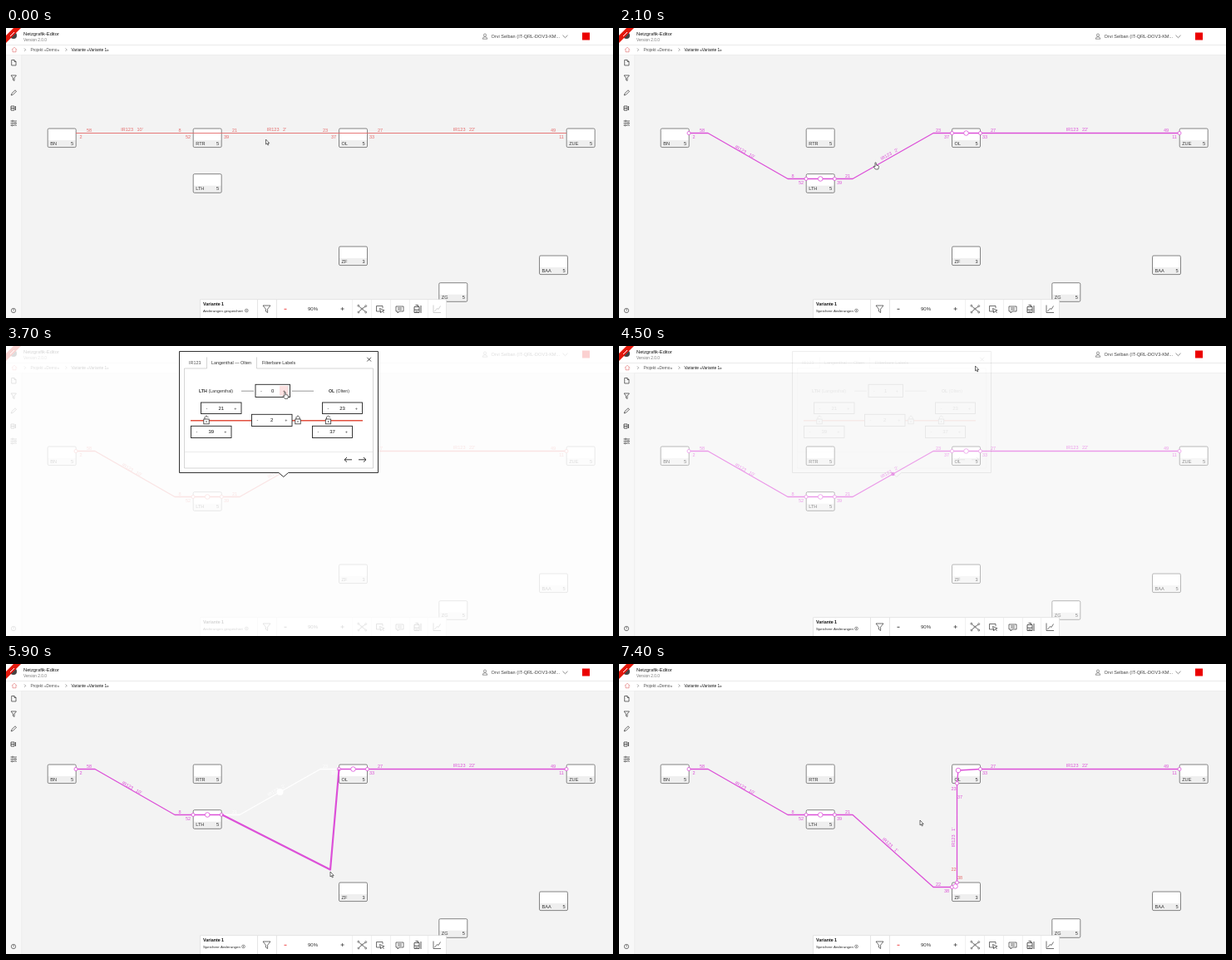
An HTML page that plays this animation: 730x349 px, repeating every 7500 ms.

```html
<!DOCTYPE html>
<html lang="de">
<head>
<meta charset="utf-8">
<title>Netzgrafik-Editor</title>
<style>
  html, body { margin: 0; width: 100%; height: 100%; overflow: hidden; background: #fff; }
  svg { display: block; width: 100vw; height: 100vh; }
  text { font-family: "Liberation Sans", Arial, sans-serif; }
</style>
</head>
<body>
<svg id="stage" viewBox="0 0 730 349"></svg>
<script>
const LOOP = 7500, STEP = 100;
const MAGENTA = '#dc50d8', RED = '#e56a6a', INK = '#333';
const stage = document.getElementById('stage');

const text = (x, y, s, size = 5.6, fill = INK, extra = '') =>
  `<text x="${x}" y="${y}" font-size="${size}" fill="${fill}" ${extra}>${s}</text>`;
const mid = (x, y, s, size, fill, extra = '') => text(x, y, s, size, fill, `text-anchor="middle" ${extra}`);
const rect = (x, y, w, h, fill, extra = '') =>
  `<rect x="${x}" y="${y}" width="${w}" height="${h}" fill="${fill}" ${extra}/>`;
const path = (d, stroke = INK, width = .7, fill = 'none') =>
  `<path d="${d}" fill="${fill}" stroke="${stroke}" stroke-width="${width}" stroke-linejoin="round"/>`;
const circle = (x, y, r, fill, stroke = 'none', width = .8) =>
  `<circle cx="${x}" cy="${y}" r="${r}" fill="${fill}" stroke="${stroke}" stroke-width="${width}"/>`;
const group = (x, y, body) => `<g transform="translate(${x} ${y})">${body}</g>`;
const fade = (opacity, body) => opacity > 0 ? `<g opacity="${opacity}">${body}</g>` : '';

// Piecewise interpolation over [time, ...values] keys.
function track(keys, t) {
  const next = keys.findIndex(k => k[0] > t);
  if (next < 0) return keys[keys.length - 1].slice(1);
  if (next === 0) return keys[0].slice(1);
  const a = keys[next - 1], b = keys[next];
  const u = (t - a[0]) / (b[0] - a[0]), e = u * u * (3 - 2 * u);
  return a.slice(1).map((v, i) => v + (b[i + 1] - v) * e);
}

const stations = {
  BN: [50.2, 121], RTR: [225.2, 121], OL: [400.5, 121], ZUE: [674.2, 121],
  LTH: [225.2, 175.7], ZF: [400.5, 263], BAA: [641.5, 274], ZG: [520.8, 306.7]
};

function station(name, active) {
  const [x, y] = stations[name];
  return group(x, y,
    rect(0, 0, 34, 22.6, '#fff', 'rx="1.5"') + rect(.4, 14, 33.2, 8.2, '#efefef') +
    rect(0, 0, 34, 22.6, 'none', `rx="1.5" stroke="${active ? MAGENTA : '#666'}" stroke-width="${active ? 1.6 : .8}"`) +
    text(3, 19.8, name) + text(31, 19.8, name === 'ZF' ? 3 : 5, 5.6, INK, 'text-anchor="end"'));
}

// Two minute labels beside a port; side is 1 when the line leaves to the right.
const minutes = (x, y, side, outer, inner, c) =>
  mid(x + side * 16, y - 2, outer, 5.5, c) + mid(x + side * 6, y + 6.5, inner, 5.5, c);
const lineName = (x, y, angle, time, c) =>
  mid(x, y, `IR123\u00a0\u00a0\u00a0${time}'`, 5.5, c, `transform="rotate(${angle} ${x} ${y})"`);
const port = (x, y, c) => circle(x, y, 2, '#fff', c);
const hub = (x, y, c, fill = '#fff') => circle(x, y, 2.8, fill, c);

function straightRoute(c, hover, white) {
  const Y = 126.5, w = hover ? 1.3 : .9;
  let s = path(`M84 ${Y}H400`, c, w) +
    minutes(84, Y, 1, 58, 2, c) + minutes(225, Y, -1, 8, 52, c) +
    minutes(259, Y, 1, 21, 39, c) + minutes(400, Y, -1, 23, 37, c) +
    lineName(151.5, 124, 0, 10, c) + lineName(325.5, 124, 0, 2, c);
  if (hover) s += port(225, Y, c) + port(259, Y, c) + hub(242.2, Y, c, white ? '#fff' : MAGENTA);
  return s;
}

function eastRoute(c, hover, direct) {
  const Y = 126.5;
  let s = path(`M${direct ? 400 : 434} ${Y}H674`, c, hover ? 1.3 : .9) +
    minutes(434, Y, 1, 27, 33, c) + minutes(674, Y, -1, 49, 11, c) + lineName(551, 124, 0, 22, c);
  if (hover) {
    s += port(434.5, Y, c) + port(674, Y, c);
    if (direct) s += port(400.5, Y, c) + hub(417.5, Y, c);
  }
  return s;
}

const westRoute = c =>
  path('M84 126.5H107L203 181.5H259', c, 1.3) +
  minutes(84, 126.5, 1, 58, 2, c) + minutes(225, 181.5, -1, 8, 52, c) +
  lineName(150.5, 150.5, 29.8, 10, c) +
  port(84, 126.5, c) + port(225, 181.5, c) + port(259.3, 181.5, c) + hub(242.2, 181.5, c);

const middleRoute = (c, stop) =>
  path('M261 181.5H281L378 126.5H400', c, 1.3) +
  minutes(259, 181.5, 1, 21, 39, c) + minutes(400, 126.5, -1, 23, 37, c) +
  lineName(326, 153.5, -29.6, 2, c) + (stop ? circle(329.5, 154, c === '#fff' ? 4 : 2.2, c) : '');

const detourRoute = c =>
  path('M261 181.5H281L378 268.5H400M402 268.5L406.5 263V143.5L408 128L434 126.5', c, 1.3) +
  minutes(259, 181.5, 1, 21, 39, c) + minutes(400, 268.5, -1, 22, 38, c) +
  lineName(325, 219, 42, 1, c) + lineName(404, 208.5, -90, 1, c) +
  mid(402.5, 152, 23, 5.5, c) + mid(410, 161.5, 37, 5.5, c) +
  mid(402.5, 249, 22, 5.5, RED) + mid(410, 259, 38, 5.5, RED) +
  port(400.5, 268.5, c) + port(406.5, 263, c) + hub(404.5, 267.5, c) +
  port(406.5, 143.5, c) + hub(408, 128, c);

const rubber = (a, [x, y], b) => path(`M${a}L${x} ${y}L${b}`, MAGENTA, 2.2);

function network(t, pointer) {
  const dialogOpen = t >= 2700 && t < 4400;
  const hover = t >= 600 && !dialogOpen;
  const c = hover ? MAGENTA : RED;
  const firstDrag = t >= 1100 && t < 1800, secondDrag = t >= 5200 && t < 6500;
  const active = {
    RTR: t >= 800 && t < 1400, LTH: t >= 1500 && t < 1800, ZF: t >= 6200 && t < 6500
  };
  let s = Object.keys(stations).map(n => station(n, active[n])).join('');
  if (t < 1800) {
    s += straightRoute(firstDrag ? '#fff' : c, hover, firstDrag);
    if (hover) s += port(84, 126.5, c);
    if (firstDrag) s += rubber('84 126.5', pointer, '400 126.5');
    return s + eastRoute(c, hover, true);
  }
  if (t < 6500) s += middleRoute(secondDrag ? '#fff' : c, t >= 3800);
  else s += detourRoute(c);
  s += westRoute(c) + eastRoute(c, true, t < 6500);
  if (secondDrag) s += rubber('260 181.5', [pointer[0], pointer[1] - 2.5], '400.5 126.5');
  return s;
}

function header() {
  return rect(0, 0, 730, 32, '#fff') + rect(0, 20, 730, .6, '#dcdcdc') + rect(0, 32, 730, .5, '#e6e6e6') +
    circle(9, 9, 4, '#444') + path('M0 18V9L9 0H18Z', 'none', 0, '#e3180c') +
    path('M5 10L10 5', '#fff', 1) +
    text(21, 9.3, 'Netzgrafik-Editor', 5.75, '#111') + text(21, 16, 'Version 2.0.0', 4.8, '#777') +
    circle(576, 8.6, 1.6, 'none', '#555', .6) + path('M573.2 13.2Q573.2 10.7 576 10.7T578.8 13.2Z', '#555', .6) +
    text(583.5, 12, 'Orvi Selban (IT-QRL-DOV3-KM...', 5.6, '#444') +
    path('M669.5 8.8L672.5 11.7L675.5 8.8', '#555', .7) +
    rect(693, 5.5, 9, 9, '#eb0000') +
    path('M7 26.2L10 23.2L13 26.2M8 25.5V28.8H12V25.5', '#d66', .6) +
    path('M22 24.5L23.7 26.2L22 27.9M71.5 24.5L73.2 26.2L71.5 27.9', '#666', .6) +
    text(29.5, 28, 'Projekt «Demo»', 4.85, '#555') + text(78.5, 28, 'Variante «Variante 1»', 4.75, '#111');
}

function sidebar() {
  return rect(0, 32.5, 19, 317, '#f8f8f8') + rect(18.6, 32.5, .5, 317, '#e4e4e4') +
    path('M6.7 38.5H10L12 40.5V45H6.7ZM10 38.5V40.5H12') +
    path('M6 57H12.4L10 60V63.5L8.4 62.4V60Z') +
    path('M6.2 81L7 78.6L11 74.8L12.5 76.2L8.5 80.2Z') +
    path('M6 94H10V99H6ZM6 96.5H10M11.5 94V99', INK, .8) +
    path('M5.5 112H13M5.5 114.5H13M5.5 117H13') +
    [[8, 112], [11, 114.5], [7.5, 117]].map(([x, y]) => circle(x, y, .9, '#fff', INK, .6)).join('') +
    circle(9, 340, 2.7, 'none', INK, .6) + path('M8.2 339.2Q9.2 337.5 9.8 339L9 340.3M9 341.3V341.8', INK, .5);
}

function toolbar(t) {
  const saving = (t >= 1900 && t < 2700) || t >= 4400;
  const minus = t < 1800 || t >= 5200 ? '#e33' : INK;
  const dividers = [302, 325, 416, 439, 462, 485, 507].map((x, i) =>
    rect(x, 327, .5, 22, i < 2 ? '#ccc' : '#e2e2e2')).join('');
  const status = saving ? 'Speichere Änderungen' : 'Änderungen gespeichert';
  const sx = saving ? 285.5 : 289.3;
  return rect(233.7, 326.8, 296, 23, '#fff', 'stroke="#d8d8d8" stroke-width=".6"') + dividers +
    text(237, 333.6, 'Variante 1', 5.3, '#111', 'font-weight="bold"') + text(237, 341.7, status, 4.4, '#222') +
    circle(sx, 340, 1.9, 'none', INK, .5) + path(`M${sx} 339V341`, INK, .5) +
    path('M309 334H318L314.6 338.2V342.5L312.4 341V338.2Z') +
    path('M334.5 338.3H337.5', minus, .9) + mid(369, 340, '90%', 6) + path('M402.5 338H406.7M404.6 336V340') +
    path('M424 334.5L428 338L432.5 335M428 338L424.5 341.5M428 338L432.5 341.5', INK, .7) +
    [[423.8, 334.2], [432.7, 334.6], [424, 342], [432.7, 342], [428, 338]].map(([x, y]) => circle(x, y, 1, '#fff', INK, .6)).join('') +
    path('M451 341H445.5V334.5H453V337M449.5 337.5L455 339.8L452.6 340.6L454.5 343M449.5 337.5L450.7 342.8L452.3 340.8') +
    path('M469 335H478V341H473L471 343V341H469ZM471 337H476M471 339H476') +
    path('M491 335.5H497V342.5H491ZM492.5 333.5H495.5V335.5M491 339H497M499 334V343M492.5 341H495.5', INK, .8) +
    path('M514 333.5V342.5H523M515.5 341L518.5 337.5L520 338.5L522.5 334.5', t < 300 ? '#bbb' : INK);
}

function stepper(x, y, w, h, value) {
  const base = y + h / 2 + 2;
  return rect(x, y, w, h, '#fff', 'stroke="#222" stroke-width=".9"') +
    mid(x + 7, base, '-') + mid(x + w / 2, base, value, 6, '#111') + mid(x + w - 7, base, '+');
}

const lock = (x, open) => rect(x - 3.2, 88, 6.4, 5.8, '#fff', `stroke="${INK}" stroke-width=".8"`) +
  path(`M${x - 2} 88V85.7Q${x} 82.5 ${x + 2} 85.7V${open ? 86 : 88}M${x} 90V92`, INK, .8);

function dialog(t) {
  const hot = t >= 3500 && t < 4100;
  return path('M208.5 6.5H447.5V152.5H339.5L333.8 157.5L328 152.5H208.5Z', '#333', 1, '#fff') +
    path('M214.5 27V147H441.5V27H301.5V13.5M241.5 13.5V27H214.5', '#bbb', .6) +
    text(220, 22, 'IR123', 5.4, '#555') + text(247, 22, 'Langenthal — Olten', 5.4) +
    text(308, 22, 'Filterbare Labels', 5.4) + path('M434.3 13.8L439 18.5M439 13.8L434.3 18.5', '#222', .8) +
    text(232, 56.3, '<tspan font-weight="bold">LTH</tspan> (Langenthal)', 5.3) +
    text(388, 56.3, '<tspan font-weight="bold">OL</tspan> (Olten)', 5.3) +
    path('M283 54.2H298M344 54.2H370', '#555', .6) + path('M222 89.8H429', '#e2503f', 1.6) +
    stepper(300, 46.3, 41.5, 15.2, t >= 3800 ? 1 : 0) +
    (hot ? rect(329, 48, 11, 12, '#e88', 'opacity=".25"') : '') +
    stepper(234.5, 68, 48.5, 13.5, 21) + stepper(380.5, 68, 48, 13.5, 23) +
    stepper(295.5, 82.3, 48.5, 14.2, 2) + stepper(222.5, 96.3, 48.5, 14.2, 39) + stepper(368.5, 96.3, 48, 14.2, 37) +
    lock(241, true) + lock(351, false) + lock(387.5, true) +
    path('M215 127.5H441', '#ddd', .6) +
    path('M416 136.8H407M410 134L407 136.8L410 139.6M424 136.8H433M430 134L433 136.8L430 139.6', '#222', .9);
}

const pointerKeys = [
  [0, 312.5, 134], [700, 243, 128.5], [1100, 243, 128.5], [1700, 242.5, 180], [1900, 255, 181],
  [2100, 308, 162], [2500, 329, 154], [2900, 329, 154], [3500, 335, 55.5], [4000, 335, 55.5],
  [4300, 436, 16], [4500, 428.5, 24], [5100, 329.5, 154], [5900, 390, 250], [6300, 416, 268],
  [6600, 416, 268], [7400, 362, 188]
];

function cursor(t, [x, y]) {
  const hand = (t >= 2000 && t < 2900) || (t >= 3500 && t < 4100);
  const shape = hand
    ? 'M0 0Q1 -.6 1.3 .6V3L4 3.7Q4.8 4 4.4 5.5L3.7 8H.4L-2 4.8Q-1.5 3.7 0 5Z'
    : 'M0 0V6L1.4 4.8L2.4 7L3.3 6.6L2.4 4.5H4.2Z';
  return group(x, y, path(shape, '#333', .7, '#fff'));
}

function draw(t) {
  const pointer = track(pointerKeys, t);
  const [veil] = track([[2600, 0], [2900, .82], [4300, .82], [4500, .42], [4800, 0]], t);
  const [panel] = track([[2600, 0], [2800, 1], [4300, 1], [4500, .08], [4700, 0]], t);
  const veilRect = y => fade(veil, rect(0, y, 730, 349 - y, '#fff'));
  const closing = t >= 4400;
  const chrome = header() + sidebar() + toolbar(t);
  stage.innerHTML = rect(0, 0, 730, 349, '#f3f3f3') + network(t, pointer) +
    (closing ? veilRect(32) + chrome : chrome + veilRect(0)) +
    fade(panel, dialog(t)) + cursor(t, pointer);
}

function tick() {
  draw(Math.floor(performance.now() % LOOP / STEP) * STEP);
  requestAnimationFrame(tick);
}
tick();
</script>
</body>
</html>
```
